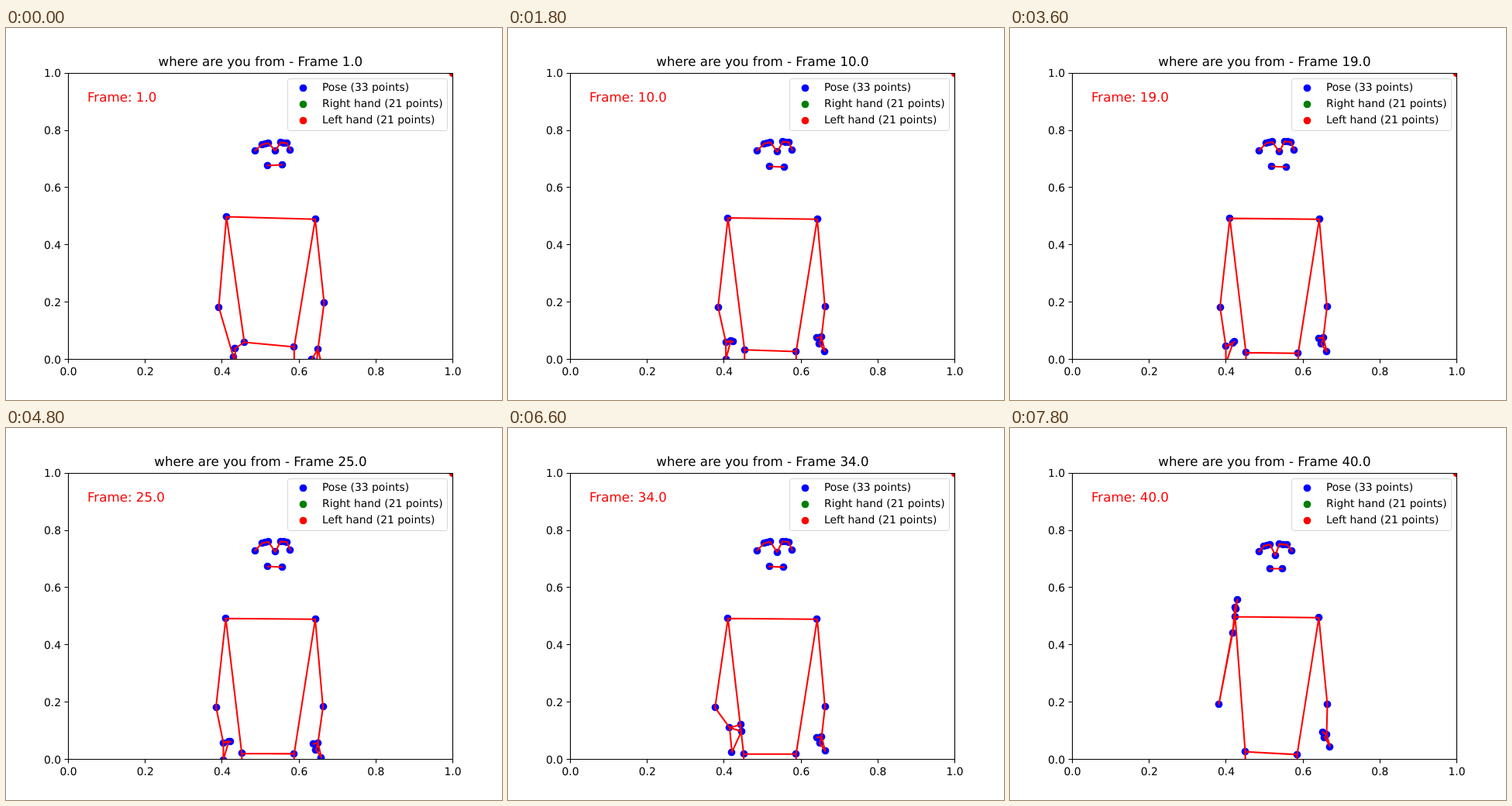
Recreate the animation shown at these times as an HTML page. Size 640 by 480 pixels, loop 8 s.

```html
<!DOCTYPE html>
<html lang="en">
<head>
<meta charset="utf-8">
<title>Pose plot</title>
<style>
  html, body { margin: 0; width: 100%; height: 100%; overflow: hidden; background: #fff; }
  svg { display: block; width: 100vw; height: 100vh; }
  text { font-family: "DejaVu Sans", sans-serif; font-size: 13.889px; text-rendering: geometricPrecision; }
  .big { font-size: 16.667px; }
  .mid { text-anchor: middle; }
  .end { text-anchor: end; }
</style>
</head>
<body>
<svg viewBox="0 0 640 480">
  <defs><clipPath id="area"><rect x="80" y="58" width="496.5" height="369.5"/></clipPath></defs>
  <g clip-path="url(#area)">
    <g transform="translate(.5 .5)">
      <g id="dots" fill="#00f"></g>
      <circle cx="576" cy="58" r="4.86" fill="#f00"/>
      <path id="bones" fill="none" stroke="#f00" stroke-width="2.083" stroke-linecap="square" stroke-linejoin="round"/>
    </g>
  </g>
  <g id="axes"></g>
  <text id="title" class="big mid" x="328.4" y="49"></text>
  <text id="label" class="big" x="105" y="95" fill="#f00"></text>
  <g id="legend">
    <rect x="363.5" y="65.5" width="206" height="67" rx="2.8" fill="#fff" fill-opacity=".8" stroke="#ccc" stroke-opacity=".8"/>
  </g>
</svg>
<script>
const STEP = 200, COUNT = 40;
const $ = id => document.getElementById(id);

function add(parent, tag, attrs, text) {
  const el = document.createElementNS(parent.namespaceURI, tag);
  for (const k in attrs) el.setAttribute(k, attrs[k]);
  if (text) el.textContent = text;
  parent.appendChild(el);
  return el;
}

// How strongly each motion acts at step n.
function motionsAt(n) {
  const k = Math.max(0, (n - 25) / 15);
  return {
    settle: Math.exp((1 - n) / 9),
    start: Math.exp((1 - n) / 2),
    sway: Math.sin(Math.PI * (n - 6) / 24),
    dip: Math.exp(-(((n - 25) / 4) ** 2)),
    reach: Math.sin(Math.PI * k),
    raise: k ** 6
  };
}

// Rest position plus the shift each motion adds; "from" makes it relative.
const parts = {
  shoulderR: { at: [283, 245.5], settle: [1, -2.5], raise: [7, -2.5] },
  shoulderL: { at: [398.5, 246.3], raise: [-.5, -2] },
  hipR: { at: [303.5, 420.5], settle: [3.5, -15.5], raise: [-.5, -3] },
  hipL: { at: [371.3, 420.5], settle: [0, -9.5], raise: [-1.3, .5] },
  kneeR: { at: [304, 520], start: [-9, -107] },
  kneeL: { at: [372, 520] },
  elbowR: { at: [270.5, 359.5], start: [3.5, 0], reach: [-4, 1], raise: [-1.5, -3.5] },
  elbowL: { at: [408.5, 359.5], start: [1.5, -5.5], raise: [.5, -3.5] },
  wristR: { at: [283, 398], start: [11, 47.6], sway: [-5, 12.5], raise: [-1, -122] },
  wristL: { at: [404, 398], start: [-2, 16], dip: [-2, 8], raise: [4, -3] },
  pinkyR: { from: "wristR", at: [0, 22], start: [2, -15], reach: [3, 13], raise: [3, -55] },
  indexR: { from: "wristR", at: [4, 1], start: [-5, -18], sway: [5, -5], reach: [14, 4], raise: [7, -49] },
  thumbR: { from: "wristR", at: [7, 6], start: [-6.6, -38], sway: [4, -12], reach: [10, -14], raise: [1, -49] },
  pinkyL: { from: "wristL", at: [4.5, 18.5], raise: [0, -3] },
  indexL: { from: "wristL", at: [-2.5, 8.5], start: [0, 15], raise: [0, -5] },
  thumbL: { from: "wristL", at: [-6, 1], start: [-2, 12], raise: [1, -4] },
  earR: { at: [321, 157.5], raise: [0, 1.5] },
  earL: { at: [366.3, 157], raise: [-3, 1] },
  nose: { at: [347, 159.3], start: [0, -1.5], raise: [-5, 4.7] },
  mouthR: { at: [337, 178], start: [0, -1], raise: [-2, 3] },
  mouthL: { at: [355.5, 179], start: [0, -3], raise: [-5, 2] }
};
for (let i = 0; i < 3; i++) {
  parts["eyeR" + i] = { at: [330 + 4 * i, 148 - .9 * i], settle: [0, 1.8], raise: [-3, 3.5] };
  parts["eyeL" + i] = { at: [354 + 4 * i, 145.6 + .5 * i], settle: [0, 1.5], raise: [i - 7, 3.5] };
}

const sides = side => names => names.split(" ").map(name => name + side);
const chains = [
  "shoulderR shoulderL hipL hipR shoulderR".split(" "),
  "earR eyeR0 eyeR1 eyeR2 nose eyeL0 eyeL1 eyeL2 earL".split(" "),
  ["mouthR", "mouthL"],
  ...["R", "L"].map(sides).flatMap(side => [
    side("hip knee"),
    side("shoulder elbow wrist pinky index wrist thumb")
  ])
];

function poseAt(n) {
  const motions = motionsAt(n), pose = {};
  for (const name in parts) {
    const part = parts[name], base = part.from ? pose[part.from] : [0, 0];
    pose[name] = part.at.map((v, axis) => {
      let sum = base[axis] + v;
      for (const m in motions) if (part[m]) sum += part[m][axis] * motions[m];
      return sum;
    });
  }
  return pose;
}

const snap = v => Math.floor(v + .5) + .5;

function buildAxes() {
  const g = $("axes");
  let d = "M80.5 58.5H576.5V427.5H80.5Z";
  for (let i = 0; i <= 5; i++) {
    const x = 80 + 99.2 * i, y = 427.2 - 73.92 * i, text = (i / 5).toFixed(1);
    d += `M${snap(x)} 427.5v5M80.5 ${snap(y)}h-5`;
    add(g, "text", { class: "mid", x: x + .6, y: 448 }, text);
    add(g, "text", { class: "end", x: 71, y: Math.round(y + 5.3) }, text);
  }
  add(g, "path", { d, fill: "none", stroke: "#000", "stroke-width": 1.1 });
}

function buildLegend() {
  [["#00f", "Pose (33 points)"], ["#008000", "Right hand (21 points)"], ["#f00", "Left hand (21 points)"]]
    .forEach(([fill, text], i) => {
      add($("legend"), "circle", { cx: 383.5, cy: 77.5 + 21 * i, r: 4.86, fill });
      add($("legend"), "text", { x: 408, y: 81 + 21 * i }, text);
    });
}

const dots = Object.keys(parts).map(name => ({ name, el: add($("dots"), "circle", { r: 4.86 }) }));

function draw(n) {
  const pose = poseAt(n);
  for (const { name, el } of dots) {
    // Markers sit on whole pixels, lines do not.
    el.setAttribute("cx", Math.round(pose[name][0]));
    el.setAttribute("cy", Math.round(pose[name][1]));
  }
  $("bones").setAttribute("d", chains.map(c => "M" + c.map(name => pose[name].join(" ")).join("L")).join(""));
  $("title").textContent = `where are you from - Frame ${n}.0`;
  $("label").textContent = `Frame: ${n}.0`;
}

let shown = 0;
const start = performance.now();
function tick() {
  const n = Math.floor((performance.now() - start) / STEP) % COUNT + 1;
  if (n !== shown) draw(shown = n);
  requestAnimationFrame(tick);
}

buildAxes();
buildLegend();
tick();
</script>
</body>
</html>
```
